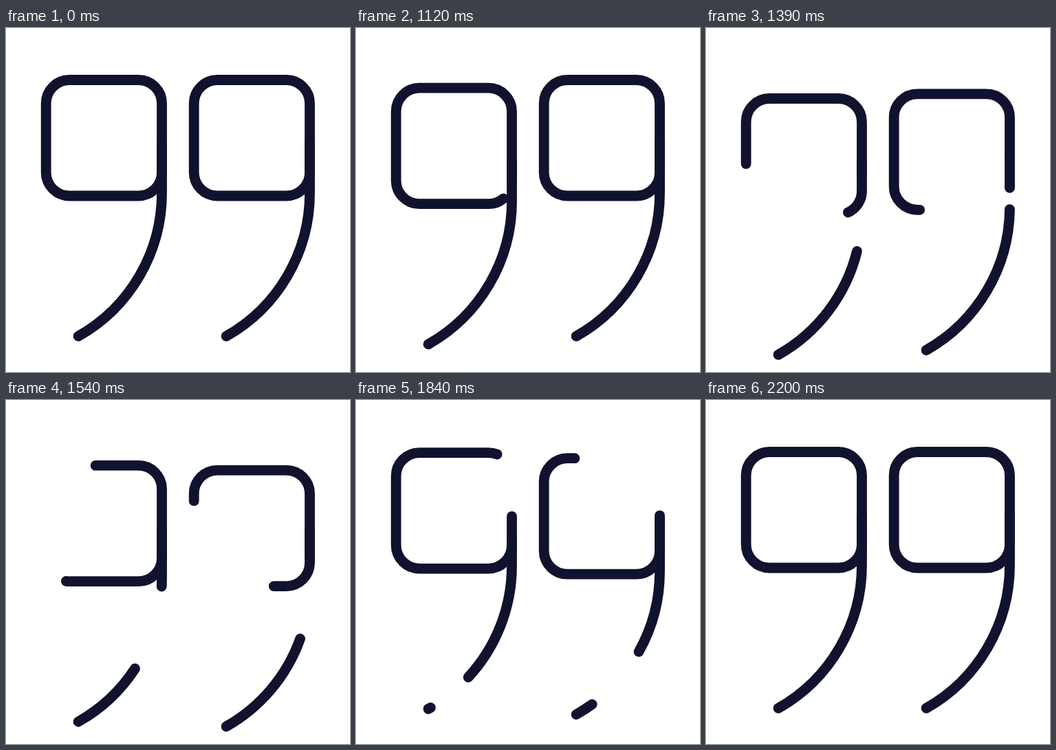
An HTML page with a canvas that plays this animation: 500x500 px, repeating every 2.23 s.

```html
<!DOCTYPE html>
<html lang="en">
<head>
<meta charset="utf-8">
<title>Quotation mark</title>
<style>
  html, body { margin: 0; width: 100%; height: 100%; overflow: hidden; background: #fff; }
  canvas { display: block; width: 500px; height: 500px; }
</style>
</head>
<body>
<canvas id="stage" width="500" height="500"></canvas>
<script>
const ctx = document.getElementById('stage').getContext('2d');

const LOOP = 2230, REST = 1030, STEP = 30;
const DROP = 27;
const LEFT = 58.2, RIGHT = 226.5, TOP = 75.5, BOTTOM = 244, RADIUS = 34;
const TAIL_BEND = 240, TAIL_RADIUS = 238.8, TAIL_ANGLE = 1.057;

// Clockwise from the foot of the right side, all the way round.
function makeBox() {
  const path = new Path2D();
  path.moveTo(RIGHT, BOTTOM - RADIUS);
  path.arcTo(RIGHT, BOTTOM, LEFT, BOTTOM, RADIUS);
  path.arcTo(LEFT, BOTTOM, LEFT, TOP, RADIUS);
  path.arcTo(LEFT, TOP, RIGHT, TOP, RADIUS);
  path.arcTo(RIGHT, TOP, RIGHT, BOTTOM, RADIUS);
  path.lineTo(RIGHT, BOTTOM - RADIUS);
  const sides = 2 * (RIGHT - LEFT + BOTTOM - TOP - 4 * RADIUS);
  return { path, length: sides + 2 * Math.PI * RADIUS };
}

function makeTail(top) {
  const path = new Path2D();
  path.moveTo(RIGHT, top);
  path.lineTo(RIGHT, TAIL_BEND);
  path.arc(RIGHT - TAIL_RADIUS, TAIL_BEND, TAIL_RADIUS, 0, TAIL_ANGLE);
  return { path, length: TAIL_BEND - top + TAIL_RADIUS * TAIL_ANGLE };
}

// Delays are counted in steps.
const quotes = [
  { x: 0, trimDelay: 0, dropDelay: 0, lines: [makeBox(), makeTail(168)] },
  { x: 215, trimDelay: 3.35, dropDelay: 6.7, lines: [makeBox(), makeTail(163)] }
];

const progress = (step, start, length) =>
  Math.min(1, Math.max(0, (step - start) / length));

const smooth = x => x * x * (3 - 2 * x);

// Cubic bezier ease (0.33, 0, 0.2, 1), solved by bisection.
function settle(x) {
  if (x <= 0 || x >= 1) return x;
  let low = 0, high = 1;
  for (let i = 0; i < 24; i++) {
    const u = (low + high) / 2, v = 1 - u;
    if (0.99 * v * v * u + 0.6 * v * u * u + u * u * u < x) low = u;
    else high = u;
  }
  return smooth(low);
}

function strokePart(line, from, to) {
  const length = (to - from) * line.length;
  if (length < 0.05) return;
  ctx.setLineDash([length + (to === 1 ? 5 : 0), 5000]);
  ctx.lineDashOffset = -from * line.length;
  ctx.stroke(line.path);
}

function drawQuote({ x, trimDelay, dropDelay, lines }, step) {
  const trimStep = step - trimDelay, dropStep = step - dropDelay;
  const front = smooth(progress(trimStep, -1, 30));
  const rear = smooth(progress(trimStep, 7.7, 28));
  const down = settle(progress(dropStep, -1, 13.5));
  const up = settle(progress(dropStep, 12.5, 19.3));

  ctx.save();
  ctx.translate(x, DROP * (down - up));
  for (const line of lines) {
    if (front === rear) {
      strokePart(line, 0, 1);
    } else {
      strokePart(line, 0, rear);
      strokePart(line, front, 1);
    }
  }
  ctx.restore();
}

function draw(time) {
  const t = time % LOOP;
  const step = t < REST ? -1 : Math.floor((t - REST) / STEP);
  ctx.fillStyle = '#fff';
  ctx.fillRect(0, 0, 500, 500);
  ctx.strokeStyle = '#11122e';
  ctx.lineWidth = 14.8;
  ctx.lineCap = 'round';
  ctx.lineJoin = 'round';
  for (const quote of quotes) drawQuote(quote, step);
}

let began;
function tick(now) {
  began ??= now;
  draw(now - began);
  requestAnimationFrame(tick);
}
draw(0);
requestAnimationFrame(tick);
</script>
</body>
</html>
```
